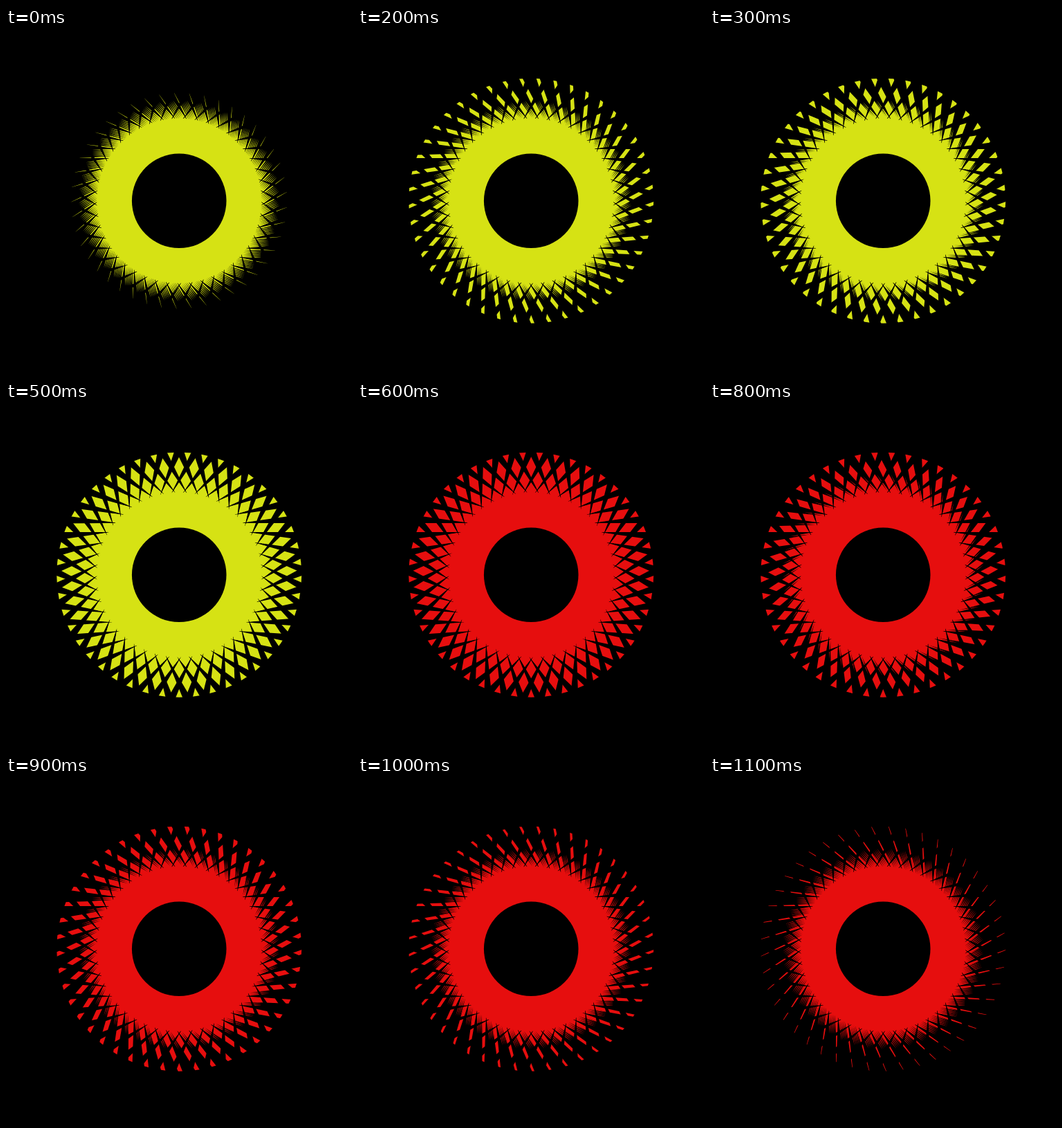
An HTML page with a canvas that plays this animation: 500 px wide and 500 px high, repeating every 1200 ms.

```html
<!DOCTYPE html>
<html lang="en">
<head>
<meta charset="utf-8">
<title>Lattice ring</title>
<style>
  html, body { margin: 0; width: 100%; height: 100%; overflow: hidden; background: #000; }
  canvas { display: block; width: 500px; height: 500px; }
</style>
</head>
<body>
<canvas id="stage" width="500" height="500"></canvas>
<script>
const ctx = document.getElementById('stage').getContext('2d');
const LOOP = 1200, STEP = 100;
const RAYS = 45, HOLE = 68.3, CORE = 119, RIM = 177, BAR = 13, STRIPES = 6;
const INNER = HOLE - BAR / 2;

// Distance along a tangent ray at which it meets radius r
const along = r => Math.sqrt(r * r - HOLE * HOLE);
const BASE = along(CORE), END = along(RIM) + 4, FRAY = along(143);

function disc(r) {
  const path = new Path2D();
  path.arc(0, 0, r, 0, 2 * Math.PI);
  return path;
}

// Adds a polygon to every ray; points are [distance, offset from centre]
function addRays(path, points, side) {
  for (let i = 0; i < RAYS; i++) {
    const a = i * 2 * Math.PI / RAYS, c = Math.cos(a), s = Math.sin(a);
    points.forEach(([d, h], k) => {
      const x = side * d, y = -h;
      path[k ? 'lineTo' : 'moveTo'](x * c - y * s, x * s + y * c);
    });
    path.closePath();
  }
}

const core = disc(CORE), rim = disc(RIM), hole = disc(HOLE);

// Fixed family of bars leaning right
const mask = new Path2D();
addRays(mask, [[0, INNER], [END, INNER], [END, INNER + BAR], [0, INNER + BAR]], 1);

// Short needles that fray the edge of the core
const needles = new Path2D();
for (let j = 0; j < STRIPES; j++) {
  const w = BAR / STRIPES, h = INNER + j * w;
  addRays(needles, [[0, h], [BASE, h], [FRAY, h + w / 2], [BASE, h + w], [0, h + w]], -1);
}

// Bars leaning left, widening from their inner edge
function sweep(width) {
  const near = Math.min(BAR, width + 1.4);
  const far = width - 1.3 * (1 - width / BAR);
  const tip = far > 0 ? END : BASE + (END - BASE) * near / (near - far);
  const top = INNER + Math.max(0, far);
  const path = new Path2D();
  addRays(path, [[0, INNER], [tip, INNER], [tip, top], [BASE, INNER + near], [0, INNER + near]], -1);
  return path;
}

function draw(t) {
  const width = Math.min(BAR, 14.3 - 0.024 * Math.abs(t - 575));
  ctx.setTransform(1, 0, 0, 1, 0, 0);
  ctx.fillStyle = '#000';
  ctx.fillRect(0, 0, 500, 500);
  ctx.translate(250.2, 249.8);
  ctx.fillStyle = t < LOOP / 2 ? '#d6e214' : '#e60e0e';
  ctx.save();
  ctx.clip(rim);
  ctx.clip(mask);
  ctx.fill(needles);
  ctx.fill(sweep(width));
  ctx.restore();
  ctx.fill(core);
  ctx.fillStyle = '#000';
  ctx.fill(hole);
}

const start = performance.now();
function tick() {
  const t = (performance.now() - start) % LOOP;
  draw(Math.floor(t / STEP) * STEP);
  requestAnimationFrame(tick);
}
tick();
</script>
</body>
</html>
```
